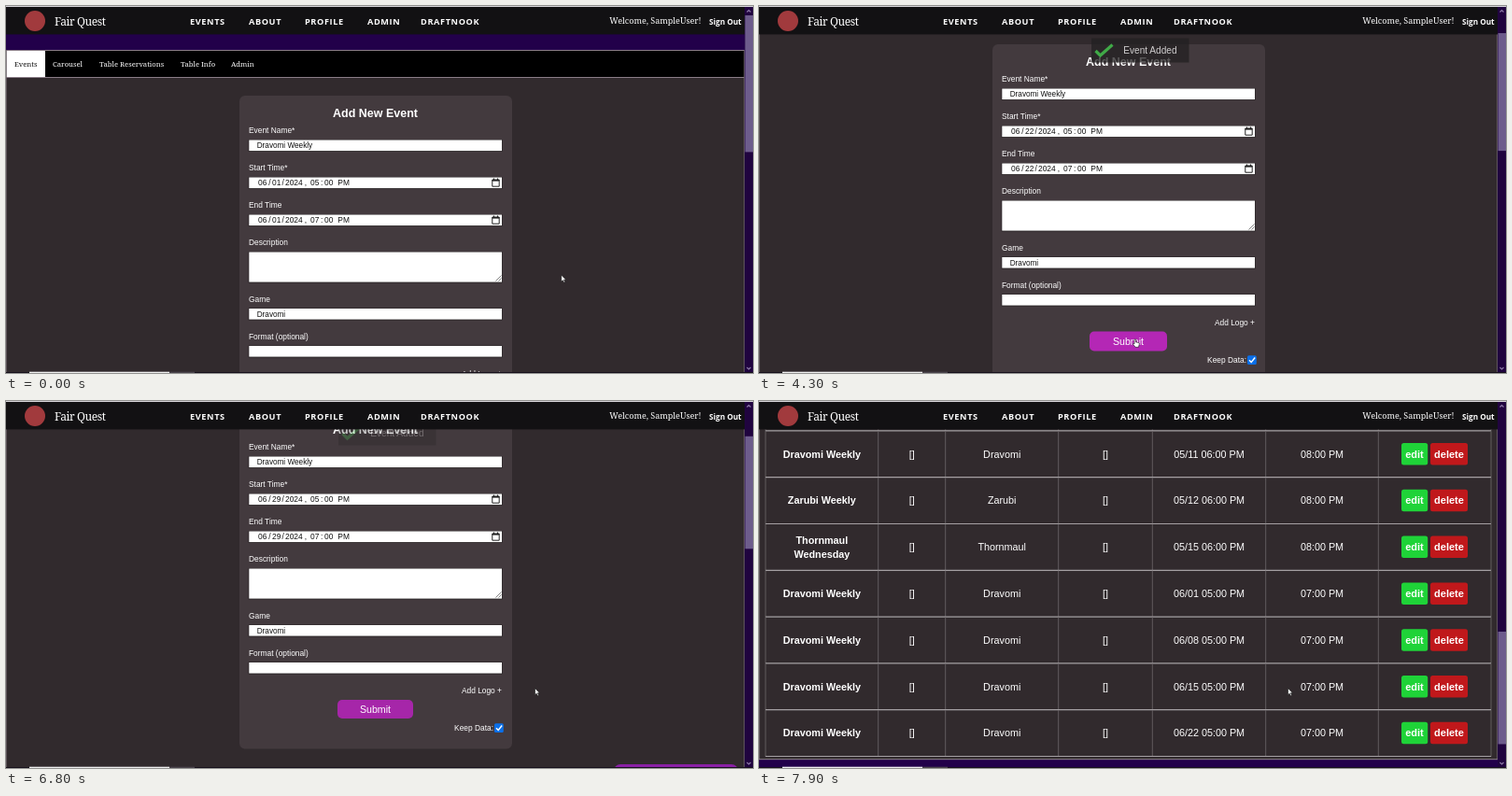
An HTML page that plays this animation: 800 px wide and 393 px high, repeating every 8000 ms.

```html
<!DOCTYPE html>
<html lang="en">
<head>
<meta charset="utf-8">
<title>Event admin</title>
<style>
  html, body { margin: 0; width: 100%; height: 100%; overflow: hidden; background: #22004a; }
  svg { display: block; width: 800px; height: 393px; }
  text { white-space: pre; fill: #fff; font-family: "Liberation Sans", Arial, sans-serif; }
  .nav { font-family: "Open Sans", Roboto, sans-serif; font-weight: 700; font-stretch: 75%; }
  .serif { font-family: "Noto Serif", serif; }
  .head { font-family: "Liberation Serif", Times, serif; font-weight: 700; }
  .bold { font-weight: 700; }
  .mid { text-anchor: middle; }
  .end { text-anchor: end; }
  .dark { fill: #111; }
</style>
</head>
<body>
<svg id="stage" viewBox="0 0 800 393"></svg>
<script>
const LOOP = 8000, STEP = 100, TOP = 10, TRACK = 374, VIEW = 364, ROW = 49.8;
const stage = document.getElementById('stage');

function add(parent, tag, attrs, content) {
  const el = document.createElementNS('http://www.w3.org/2000/svg', tag);
  for (const k in attrs) el.setAttribute(k, attrs[k]);
  if (content !== undefined) el.textContent = content;
  parent.append(el);
  return el;
}
const group = parent => add(parent, 'g', {});
const rect = (p, x, y, width, height, fill, rx = 0) => add(p, 'rect', { x, y, width, height, fill, rx });
const path = (p, d, stroke, width = 1, fill = 'none') =>
  add(p, 'path', { d, stroke, fill, 'stroke-width': width });
const text = (p, x, y, size, str, cls = '') =>
  add(p, 'text', { x, y, 'font-size': size, class: cls }, str);

// Scrolling page
const page = group(stage);
rect(page, 0, 47, 791, 1053, '#312a2d');
rect(page, 0, 47, 791, 29, '#000');
rect(page, 0, 47, 42, 29, '#fff');
path(page, 'M0 47.5H791M0 76.5H791', '#8b7d88');
path(page, 'M.5 47V1100M790.5 47V1100', '#6b6168', .8);
path(page, 'M0 1099.7H791', '#8a8288');
[['Events', 9], ['Carousel', 50], ['Table Reservations', 100], ['Table Info', 187], ['Admin', 241]]
  .forEach(([name, x], i) => text(page, x, 64.5, 7.7, name, i ? 'serif' : 'serif dark'));

// Form
rect(page, 250, 96, 292, 360.5, '#433a3e', 6);
text(page, 395.5, 119, 12.5, 'Add New Event', 'bold mid');

function field(label, y, height = 12) {
  text(page, 260, y, 8.4, label);
  rect(page, 259.7, y + 7.1, 271.8, height + .8, '#252022');
  rect(page, 260.3, y + 7.5, 270.7, height - .4, '#fff');
}
function dateField(label, y, hour) {
  field(label, y);
  const put = (x, str) => text(page, x, y + 16.2, 8.4, str, 'dark');
  put(270, '06'); put(281.3, '/');
  const day = put(285, '01');
  put(295.5, '/'); put(299, '2024'); put(319.7, ',');
  put(326, hour); put(337, ':'); put(341, '00'); put(355.3, 'PM');
  path(page, `M520.8 ${y + 10}h7.4v7.2h-7.4zM522.5 ${y + 8.5}v1.5m4 -1.5v1.5`, '#222', 1);
  path(page, `M520.8 ${y + 10.8}h7.4`, '#222', 1.6);
  return day;
}
field('Event Name*', 136);
text(page, 268.7, 152.2, 8.2, 'Dravomi Weekly', 'dark');
const days = [dateField('Start Time*', 176, '05'), dateField('End Time', 216, '07')];
field('Description', 256, 32.5);
path(page, 'M524.5 294.5l6 -6M527.5 294.5l3 -3', '#666', .8);
field('Game', 316.5);
text(page, 268.7, 332.7, 8.2, 'Dravomi', 'dark');
field('Format (optional)', 356.5);
text(page, 531, 396.8, 8.4, 'Add Logo +', 'end');
const submit = rect(page, 355, 404, 81, 20, '#a626a9', 5);
text(page, 395.5, 418, 10.6, 'Submit', 'mid');
text(page, 522, 436.8, 8.4, 'Keep Data:', 'end');
rect(page, 523, 429.2, 9.8, 9.8, '#0b6fe8', 1.5);
path(page, 'M525 434.2l2.2 2.3l4 -5', '#fff', 1.4);

// Table
rect(page, 651, 473, 133, 30, '#8b20a6', 7);
text(page, 717.5, 491.5, 9.95, 'Delete Past Events', 'bold mid');
const cols = [7, 127.7, 199.7, 320.7, 421.3, 542.7, 663.3, 784];
const center = i => (cols[i] + cols[i + 1]) / 2;
rect(page, 7, 511, 777, 38, '#848084');
['Name', 'Desc', 'Game', 'Format', 'Start Date', 'End Time', 'Actions']
  .forEach((name, i) => text(page, center(i), 535.5, 15.1, name, 'head mid'));

const games = {
  L: ['Learn QVL|Thursday', 'Runic: The|Convening'],
  P: ['Dravomi Weekly', 'Dravomi'],
  Y: ['Zarubi Weekly', 'Zarubi'],
  W: ['Thornmaul|Wednesday', 'Thornmaul']
};
function cell(p, col, y, str, cls = '') {
  const lines = str.split('|');
  lines.forEach((line, i) =>
    text(p, center(col), y + 3.8 + (i - (lines.length - 1) / 2) * 15, 10.8, line, cls + ' mid'));
}
const rows = ['L05/02', 'P05/04', 'Y05/05', 'W05/08', 'P05/11', 'Y05/12', 'W05/15',
  'P06/01', 'P06/08', 'P06/15', 'P06/22'].map((entry, i) => {
  const row = group(page), y = 573.5 + ROW * i, date = entry.slice(1);
  const [name, game] = games[entry[0]];
  const late = i < 7;
  cell(row, 0, y, name, 'bold');
  cell(row, 1, y, '[]');
  cell(row, 2, y, game);
  cell(row, 3, y, '[]');
  cell(row, 4, y, `${date} ${late ? '06' : '05'}:00 PM`);
  cell(row, 5, y, `${late ? '08' : '07'}:00 PM`);
  rect(row, 688, y - 11.7, 28.2, 23.5, '#1fd338', 2.5);
  rect(row, 719, y - 11.7, 40, 23.5, '#c0181b', 2.5);
  text(row, 702, y + 3.8, 11, 'edit', 'bold mid');
  text(row, 739, y + 3.8, 11, 'delete', 'bold mid');
  const top = 549 + ROW * i;
  path(row, cols.map(x => `M${x} ${top}v${ROW}`).join(''), '#686265', .9);
  path(row, `M7 ${top + ROW - .3}H784`, '#a5a0a3', 1.2);
  return row;
});
path(page, cols.map(x => `M${x} 511v38`).join('') + 'M7 511H784', '#9c989b', .9);
path(page, 'M7 549H784', '#aaa5a8', 1.1);

// Toast
const toast = group(stage);
rect(toast, 356, 41, 104.5, 26, '#222021');
path(toast, 'M360.5 54.5l5 5L378.5 48', '#3fce4b', 3.2);
text(toast, 390.3, 57.3, 10.1, 'Event Added');

// Fixed header
rect(stage, 0, 0, 791, 30.4, '#121113');
rect(stage, 0, 0, 800, 1, '#d8d6da');
add(stage, 'circle', { cx: 31, cy: 16, r: 11, fill: '#a13a3d' });
text(stage, 52, 20.5, 12, 'Fair Quest', 'serif').setAttribute('letter-spacing', -.4);
[['EVENTS', 197], ['ABOUT', 260], ['PROFILE', 320], ['ADMIN', 387], ['DRAFTNOOK', 444]]
  .forEach(([name, x]) => text(stage, x, 19.6, 9.2, name, 'nav').setAttribute('letter-spacing', .6));
text(stage, 744.5, 18.8, 9, 'Welcome, SampleUser!', 'serif end');
text(stage, 753, 19.6, 8.2, 'Sign Out', 'nav');

// Scrollbar and bottom edge
rect(stage, 791, 1, 9, 392, '#20043f');
const thumb = rect(stage, 791.5, TOP, 8.5, 146, '#6d5c8c');
path(stage, 'M793.5 6.5l2 -2l2 2M793.5 387l2 2l2 -2', '#8d7aa8', 1.2);
rect(stage, 0, 392, 800, 1, '#17111c');
rect(stage, 175, 391.7, 27, 1.3, '#4a444c');
rect(stage, 25, 391.7, 150, 1.3, '#eee');

// Pointers, both with the hot spot at 0,0
const arrow = path(stage, 'M0 0V7.2L1.7 5.7L2.9 8.2L4.1 7.6L2.9 5.2H5Z', '#111', .6, '#fff');
const hand = path(stage,
  'M-.4 0Q.5 -.9 1.2 0V3L4 3.5Q5 3.8 4.8 5L4 8.3H.6L-2 5.2Q-2.3 4 -.4 4.8Z', '#111', .6, '#fff');

// Motion
const clamp = v => Math.max(0, Math.min(1, v));
const ease = u => u * u * (3 - 2 * u);
const adds = [2100, 3200, 4300, 5500];
const stops = [[0, 594.7, 288], [450, 594.7, 288], [1100, 576.8, 256.2], [1250, 576.8, 256.2],
  [1900, 402.5, 357], [5700, 402.5, 357], [6500, 566.5, 307.5], [LOOP, 566.5, 307.5]];

function pointer(t) {
  const i = stops.findIndex((s, n) => n && t <= s[0]);
  const [t0, x0, y0] = stops[i - 1], [t1, x1, y1] = stops[i];
  const u = ease((t - t0) / (t1 - t0));
  return [x0 + (x1 - x0) * u, y0 + (y1 - y0) * u];
}
function scrollAt(t) {
  if (t < 6700) return 55 * ease(clamp((t - 550) / 250));
  if (t < 6800) return 55 + 29 * ((t - 6700) / 100) ** 2;
  if (t < 7100) return 84 + 284 * (t - 6800) / 300;
  return 368 + 348 * (1 - (1 - clamp((t - 7100) / 800)) ** 2.2);
}

function draw(t) {
  const y = scrollAt(t), count = adds.filter(a => t >= a).length;
  page.setAttribute('transform', `translate(0 ${-y})`);
  days.forEach(d => d.textContent = String(1 + 7 * count).padStart(2, '0'));
  rows.forEach((r, i) => r.style.display = i < 7 + count ? '' : 'none');

  const total = 930 + 50 * count;
  thumb.setAttribute('y', TOP + y * TRACK / total);
  thumb.setAttribute('height', VIEW * TRACK / total);

  const shown = Math.max(...adds.map(a => clamp(Math.min((t - a) / 200, (a + 1400 - t) / 400))));
  toast.setAttribute('opacity', shown);
  toast.setAttribute('transform', `translate(0 ${-26 * (1 - shown)})`);

  const [px, py] = pointer(t);
  const over = px > 355 && px < 436 && py + y > 404 && py + y < 424;
  const grow = over ? 1 : 0;
  submit.setAttribute('x', 355 - grow);
  submit.setAttribute('y', 404 - grow / 2);
  submit.setAttribute('width', 81 + 2 * grow);
  submit.setAttribute('height', 20 + grow);
  submit.setAttribute('fill', over ? '#b427b5' : '#a626a9');
  arrow.style.display = over ? 'none' : '';
  hand.style.display = over ? '' : 'none';
  for (const p of [arrow, hand]) p.setAttribute('transform', `translate(${px} ${py})`);
}

// The picture advances ten times a second; the small lead absorbs clock rounding.
const start = performance.now();
function tick() {
  const t = performance.now() - start + 8;
  draw(Math.floor(t / STEP) * STEP % LOOP);
  requestAnimationFrame(tick);
}
tick();
</script>
</body>
</html>
```
